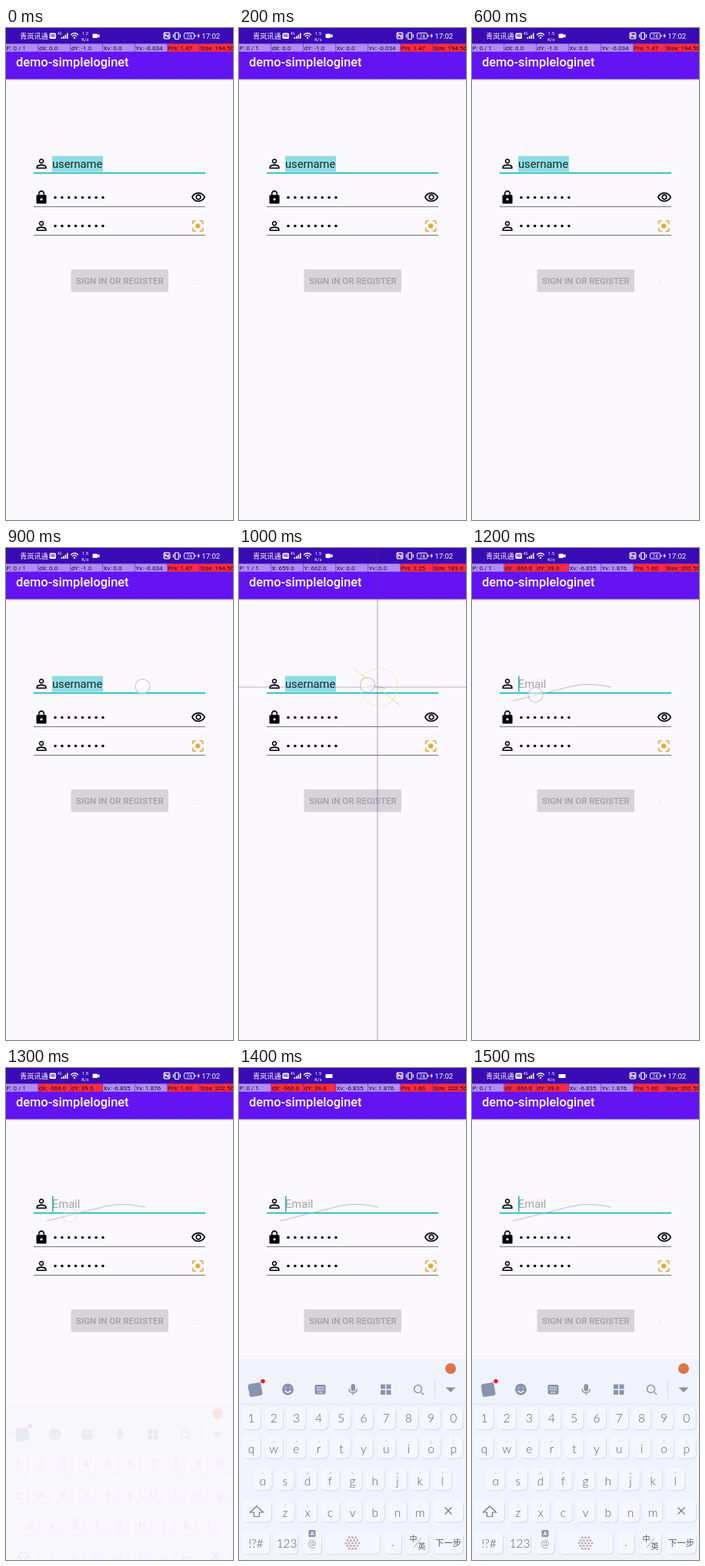
An HTML page that plays this animation: 295x640 px, repeating every 1.6 s.

```html
<!DOCTYPE html>
<html lang="en">
<head>
<meta charset="utf-8">
<title>Login form</title>
<style>
html, body { margin: 0; width: 100%; height: 100%; overflow: hidden; background: #faf8fd; }
svg { display: block; width: 100vw; height: 100vh; }
text { font-family: Roboto, "Noto Sans CJK SC", "Noto Sans CJK", sans-serif; white-space: pre; }
.mid { text-anchor: middle; }
.key { font: 300 15.5px Lato, Inter, "Noto Sans CJK SC", "Noto Sans CJK", sans-serif; fill: #555c75; }
.alt { font-size: 6px; fill: #bcc2d4; }
.line { fill: none; }
</style>
</head>
<body>
<svg id="stage" viewBox="0 0 295 640">
  <defs>
    <linearGradient id="shade" x2="0" y2="1">
      <stop stop-color="#b9b3c6"/><stop offset="1" stop-color="#faf8fd"/>
    </linearGradient>
    <path id="person" d="M12 5.9c1.16 0 2.1.94 2.1 2.1s-.94 2.1-2.1 2.1S9.9 9.16 9.9 8s.94-2.1 2.1-2.1m0 9c2.97 0 6.1 1.46 6.1 2.1v1.1H5.9V17c0-.64 3.13-2.1 6.1-2.1M12 4C9.79 4 8 5.79 8 8s1.79 4 4 4 4-1.79 4-4-1.79-4-4-4zm0 9c-2.67 0-8 1.34-8 4v3h16v-3c0-2.66-5.33-4-8-4z"/>
  </defs>
  <rect width="295" height="640" fill="#faf8fd"/>
  <rect y="66" width="295" height="3" fill="url(#shade)"/>
  <rect y="20" width="295" height="46.5" fill="#6414f2"/>
  <text x="13" y="50" font-size="16.4" font-weight="500" fill="#fff">demo-simpleloginet</text>

  <!-- status bar -->
  <rect width="295" height="20.5" fill="#390bb4"/>
  <g fill="#fff">
    <text x="18" y="13.8" font-size="9.2">青岚讯通</text>
    <rect x="56.5" y="6.5" width="8.5" height="7.5" rx="1.5"/>
    <text x="60.8" y="12" font-size="4.6" font-weight="700" fill="#390bb4" class="mid">HD</text>
    <text x="67" y="9" font-size="4.5">4G</text>
    <path d="M71.5 14v-2h1.6v2zm2.5 0v-3.5h1.6V14zm2.5 0V8.700h1.6V14zm2.500 0V6.500h1.600V14z"/>
    <g class="line" stroke="#fff" stroke-width="1.2" fill="none">
      <path d="M84 9q5-4.500 10 0M85.800 11q3.200-2.800 6.400 0"/>
      <rect x="205.200" y="6.200" width="7.600" height="7.600" rx="1"/>
      <path d="M207 12V8l4 4V8"/>
      <rect x="219.600" y="6" width="4.800" height="8.500" rx=".8"/>
      <path d="M217.500 8v4.500M226.500 8v4.500"/>
      <rect x="231.500" y="6.500" width="13" height="7.500" rx="1.500" stroke-width=".9"/>
      <path d="M246 9v2.500"/>
    </g>
    <circle cx="89" cy="13" r="1.200"/>
    <text id="speed" x="103" y="9" font-size="6" class="mid"></text>
    <text x="103" y="16.500" font-size="6" class="mid">K/s</text>
    <path id="camera" d="M113.500 7.500h4.500q1 0 1 1v.8l2.500-1.500v5l-2.500-1.500v.7q0 1-1 1h-4.500q-1 0-1-1V8.500q0-1 1-1z"/>
    <path id="ime" d="M112.500 8h9v5h-9z"/>
    <text x="238" y="12.800" font-size="6.800" class="mid">74</text>
    <path d="M250.800 6.500l-2.600 4.200h1.800l-.6 3.300 2.700-4.400h-1.800z"/>
    <text x="254.200" y="13.800" font-size="9.700">17:02</text>
  </g>
  <g id="readout"></g>

  <!-- form -->
  <g id="form">
    <rect id="mark" x="60" y="166.500" width="66" height="20.500" fill="#8edde2"/>
    <text id="user" x="60" y="182" font-size="14.700"></text>
    <rect id="caret" x="60" y="166.500" width="1.600" height="20.500" fill="#20b8c0"/>
    <rect x="36" y="187.700" width="223" height="1.900" fill="#22bcc2"/>
    <path d="M36 232.500h223M36 269.500h223" stroke="#77747b"/>
    <use href="#person" transform="translate(36.200 166.700) scale(.82)"/>
    <use href="#person" transform="translate(36.200 247.700) scale(.82)"/>
    <path transform="translate(36.200 210.500) scale(.82)" d="M18 8h-1V6c0-2.760-2.240-5-5-5S7 3.240 7 6v2H6c-1.100 0-2 .9-2 2v10c0 1.100.9 2 2 2h12c1.100 0 2-.9 2-2V10c0-1.100-.9-2-2-2zm-6 9c-1.100 0-2-.9-2-2s.9-2 2-2 2 .9 2 2-.9 2-2 2zm3.100-9H8.900V6c0-1.710 1.390-3.100 3.100-3.100 1.710 0 3.100 1.390 3.100 3.100v2z"/>
    <path transform="translate(240.200 210.500) scale(.82)" d="M12 6c3.790 0 7.170 2.130 8.820 5.500C19.170 14.870 15.790 17 12 17s-7.170-2.130-8.820-5.500C4.830 8.130 8.210 6 12 6m0-2C7 4 2.730 7.110 1 11.500 2.730 15.890 7 19 12 19s9.270-3.110 11-7.500C21.270 7.110 17 4 12 4zm0 5c1.380 0 2.500 1.120 2.500 2.500S13.380 14 12 14s-2.500-1.120-2.500-2.500S10.620 9 12 9m0-2c-2.480 0-4.500 2.020-4.500 4.500S9.520 16 12 16s4.500-2.020 4.500-4.500S14.480 7 12 7z"/>
    <path transform="translate(239.400 247.700) scale(.82)" fill="#e5a93c" d="M5 15H3v4c0 1.100.9 2 2 2h4v-2H5zM5 5h4V3H5c-1.100 0-2 .9-2 2v4h2zm14-2h-4v2h4v4h2V5c0-1.100-.9-2-2-2zm0 16h-4v2h4c1.100 0 2-.9 2-2v-4h-2zM12 8c-2.210 0-4 1.790-4 4s1.790 4 4 4 4-1.790 4-4-1.790-4-4-4z"/>
    <rect x="84.500" y="314" width="126.500" height="29.500" rx="2" fill="#d6d4d8"/>
    <text x="91" y="333" font-size="11.500" font-weight="500" fill="#a09ea3">SIGN IN OR REGISTER</text>
    <circle cx="244.500" cy="328.500" r=".6" fill="#b5b2b8"/>
  </g>

  <g id="keyboard"></g>

  <!-- touch overlay -->
  <g id="cross" class="line">
    <path d="M0-640V640" stroke="#5a3c96" stroke-opacity=".55" stroke-width=".9"/>
    <path d="M-295 0H295" stroke="#5a3c82" stroke-opacity=".45" stroke-width=".9"/>
    <circle cx="2" r="24.500" stroke="#ece6ae" stroke-width=".8"/>
    <path d="M-30-24L29.500 24" stroke="#e6df82"/>
    <path d="M-15-3.500L10 1.500" stroke="#b48ac4" stroke-width=".8"/>
  </g>
  <path id="trail" class="line" d="M53 199L131 179.500Q154 174.500 181 181" stroke="#b3b2c2" stroke-width=".9"/>
  <circle id="touch" r="9.500" fill="#fff" fill-opacity=".5" stroke="#c6bfd8" stroke-width="1.100"/>
</svg>
<script>
const $ = id => document.getElementById(id);
const show = (id, on) => $(id).style.display = on ? "" : "none";

function add(parent, tag, attrs, text = "") {
  const el = document.createElementNS("http://www.w3.org/2000/svg", tag);
  for (const k in attrs) el.setAttribute(k, attrs[k]);
  el.textContent = text;
  parent.append(el);
  return el;
}

// password dots
for (const y of [220.5, 257.5])
  for (let i = 0; i < 8; i++)
    add($("form"), "circle", { cx: 64 + i * 8.85, cy: y, r: 1.75 });

// readout cells
const cells = Array.from({ length: 7 }, (_, i) => ({
  box: add($("readout"), "rect", { x: i * 42, y: 20.5, width: i < 6 ? 41.4 : 43, height: 10.3 }),
  label: add($("readout"), "text", { x: i * 42 + .6, y: 28.6, "font-size": 8, fill: "#150a22" })
}));

const idle = ["P: 0 / 1", "dX: 0.0", "dY: -1.0", "Xv: 0.0", "Yv: -0.034", "Prs: 1.47", "Size: 194.50"];
const press = ["P: 1 / 1", "X: 659.0", "Y: 662.0", "Xv: 0.0", "Yv: 0.0", "Prs: 2.25", "Size: 183.0"];
const drag = ["P: 1 / 1", "X: 623.0", "Y: 652.0", "Xv: -3.470", "Yv: -0.848", "Prs: 2.59", "Size: 179.0"];
const done = ["P: 0 / 1", "dX: -366.0", "dY: 39.0", "Xv: -6.835", "Yv: 1.876", "Prs: 1.60", "Size: 202.50"];

function buildKeyboard() {
  const kb = $("keyboard"), gray = "#8a93ac";
  const mid = (x, y, s, attrs) => add(kb, "text", { x, y, class: "key mid", ...attrs }, s);
  const cap = (x, y, w) => {
    const box = { x: x - w / 2, y: y - 14.5, width: w, height: 29, rx: 6 };
    add(kb, "rect", { ...box, fill: "#d7dded", transform: "translate(1 1.3)" });
    add(kb, "rect", { ...box, fill: "#f5f7fe" });
  };
  const icon = (d, attrs) => add(kb, "path", { d, fill: gray, ...attrs });
  const row = (chars, x, y, alts = "") => [...chars].forEach((c, i) => {
    const cx = x + i * 29.2;
    cap(cx, y, 24);
    mid(cx, y + (alts ? 8 : 5.5), c, alts ? {} : { "font-size": 17 });
    if (alts) mid(cx, y - 5.5, alts[i], { class: "alt mid" });
  });

  add(kb, "rect", { y: 379, width: 295, height: 330, fill: "#f0f3fc" });
  add(kb, "rect", { y: 437, width: 295, height: 1, fill: "#e2e7f4" });
  add(kb, "circle", { cx: 275, cy: 391, r: 7, fill: "#df7448" });

  // toolbar
  add(kb, "rect", { x: 12.5, y: 410, width: 17, height: 17, rx: 3, fill: gray, transform: "rotate(-10 21 418)" });
  add(kb, "circle", { cx: 31, cy: 407.5, r: 2.8, fill: "#ee2020" });
  add(kb, "circle", { cx: 63.5, cy: 418, r: 7.5, fill: gray });
  icon("M60.5 416v.1M66.5 416v.1M60 420q3.500 4 7 0", { fill: "none", stroke: "#f0f3fc", "stroke-width": 1.6, "stroke-linecap": "round" });
  add(kb, "rect", { x: 98.5, y: 412, width: 14, height: 12.5, rx: 2, fill: gray });
  icon("M101 415.500h9M101 418.500h9M102.500 421.800h6", { stroke: "#f0f3fc", "stroke-width": 1.4, "stroke-dasharray": "1.6 .9" });
  add(kb, "rect", { x: 145.5, y: 411, width: 5.5, height: 9.5, rx: 2.7, fill: gray });
  icon("M143 417q0 5.500 5.200 5.500t5.200-5.500M148.200 422.500v3", { fill: "none", stroke: gray, "stroke-width": 1.4 });
  icon("M184 411.500h6v6h-6zm7.500 0h6v6h-6zm-7.500 7.500h6v6h-6zm7.500 0h6v6h-6z");
  icon("M237 422l3 3M237.500 417.500a5 5 0 1 1-10 0a5 5 0 1 1 10 0", { fill: "none", stroke: gray, "stroke-width": 1.5 });
  icon("M254 406h.9v25h-.9z", { fill: "#d5dbe9" });
  icon("M268.500 415.500h13l-6.500 6.500z");

  // keys
  row("1234567890", 16, 455.5);
  row("qwertyuiop", 16, 493, "`~+=…-^_[]");
  row("ɑsdfghjkl", 30.7, 534.5, "~!@#%'&*?");
  row("zxcvbnm", 60, 576, "():_;\"/");
  cap(23, 576, 38);
  icon("M23 570l-8.500 8h5v5.500h7V578h5z", { fill: "none", stroke: "#6c748e", "stroke-width": 1.2 });
  cap(272, 576, 38);
  icon("M267.500 571.500l9 9M276.500 571.500l-9 9", { stroke: "#6c748e", "stroke-width": 1.2 });

  for (const [x, w] of [[22, 36], [62, 28], [95, 24], [148, 70], [200, 22], [232, 28], [272, 38]]) cap(x, 617.5, w);
  mid(22, 623.5, "!?#");
  mid(62, 623.5, "123");
  mid(95, 622.5, "@", { style: "font-size:13px" });
  add(kb, "rect", { x: 90.5, y: 601, width: 9, height: 9, rx: 1.5, fill: gray });
  mid(95, 608.3, "A", { style: "font:700 7.5px Roboto,sans-serif;fill:#fff" });
  for (let r = -2; r <= 2; r++) {
    const n = 5 - Math.abs(r);
    for (let i = 0; i < n; i++)
      add(kb, "circle", { cx: 147.5 + (i - (n - 1) / 2) * 4.3, cy: 618 + r * 3.6, r: 1.5, fill: (i + r) % 2 ? "#a9b0cc" : "#d6a3b4" });
  }
  mid(200, 622, ".");
  mid(226.5, 616, "中", { style: "font-size:10px" });
  mid(237.5, 626, "英", { style: "font-size:10px" });
  icon("M227 624l10-13", { stroke: gray, "stroke-width": .8 });
  mid(272, 621.5, "下一步", { style: "font-size:11.5px" });
}
buildKeyboard();

// The screen refreshes every 100 ms.
function render(step) {
  const lifted = step >= 12, held = step === 10 || step === 11;
  $("speed").textContent = step < 1 ? "1.2" : "1.5";
  show("camera", step < 14);
  show("ime", step >= 14);

  const values = step < 10 ? idle : step < 11 ? press : step < 12 ? drag : done;
  cells.forEach(({ box, label }, i) => {
    const red = i > 4 || lifted && (i === 1 || i === 2);
    box.setAttribute("fill", red ? "#fb2c3c" : "#b18cf3");
    label.textContent = values[i];
  });

  show("mark", !lifted);
  show("caret", lifted);
  $("user").textContent = lifted ? "Email" : "username";
  $("user").setAttribute("fill", lifted ? "#a5a3a8" : "#1c2a2e");

  show("cross", held);
  $("cross").setAttribute("transform", step < 11 ? "translate(180 181)" : "translate(170.3 178.4)");
  show("trail", lifted);

  const spot = { 9: [177.5, 180], 10: [167, 178], 11: [142.5, 177], 12: [82.5, 191], 13: [82.5, 191] }[step];
  show("touch", spot);
  if (spot) $("touch").setAttribute("transform", `translate(${spot})`);
  $("touch").setAttribute("opacity", step === 13 ? .4 : 1);

  show("keyboard", step >= 13);
  $("keyboard").setAttribute("opacity", step === 13 ? .13 : 1);
  $("keyboard").setAttribute("transform", `translate(0 ${step === 13 ? 58.5 : 0})`);
}

let start, last;
function tick(now) {
  start ??= now;
  const step = Math.floor((now - start) % 1600 / 100);
  if (step !== last) render(last = step);
  requestAnimationFrame(tick);
}
render(0);
requestAnimationFrame(tick);
</script>
</body>
</html>
```
